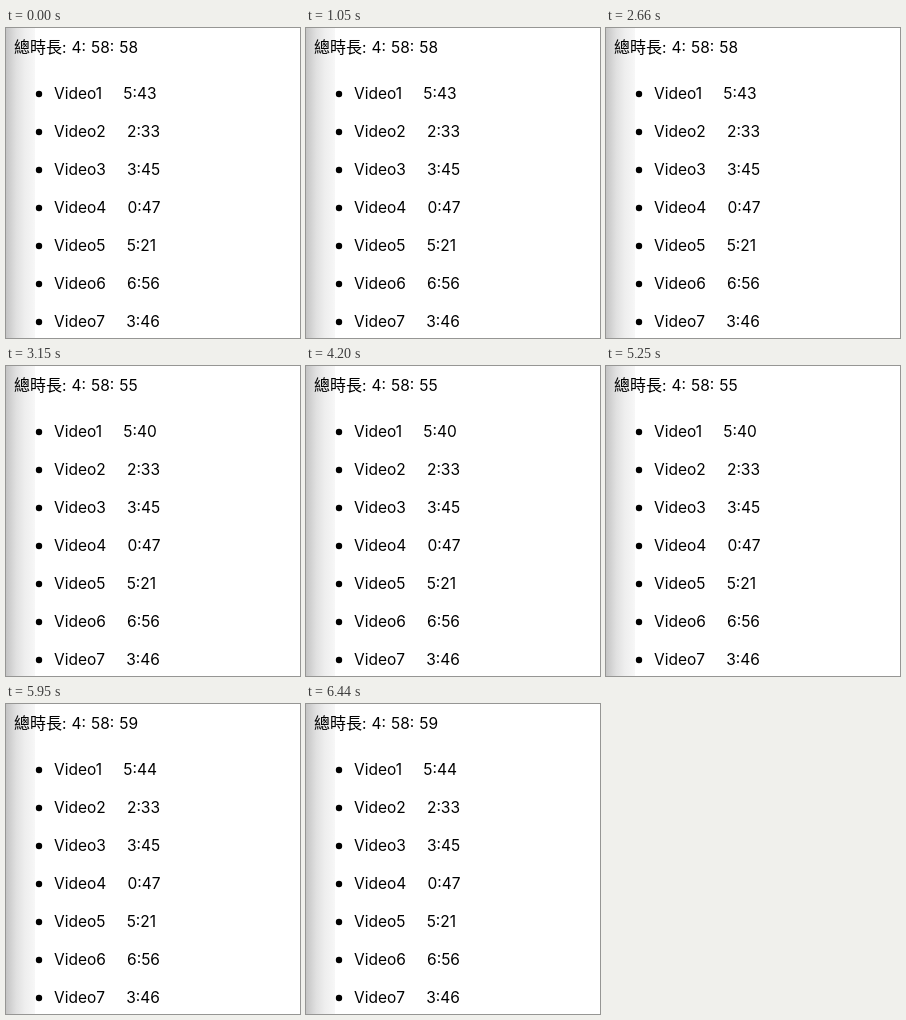
An HTML page with a canvas that plays this animation: 294x310 px, repeating every 6650 ms.

```html
<!DOCTYPE html>
<html lang="zh-Hant">
<head>
<meta charset="utf-8">
<title>Video list</title>
<style>
html, body { margin: 0; width: 100%; height: 100%; overflow: hidden; background: #fff; }
canvas { display: block; width: 294px; height: 310px; }
</style>
</head>
<body>
<canvas id="stage"></canvas>
<script>
const W = 294, H = 310, LOOP = 6650;
const ROW = 38, TEXT_X = 48, GAP = 21.2;
const LATIN = '15.5px Inter, "Open Sans", sans-serif';
const HAN = '16px "Noto Sans CJK TC", "Noto Sans CJK JP", "Noto Sans CJK", sans-serif';
const TIMES = ['2:33', '3:45', '0:47', '5:21', '6:56', '3:46'];

const canvas = document.getElementById('stage');
const ctx = canvas.getContext('2d');
const ratio = window.devicePixelRatio || 1;
canvas.width = W * ratio;
canvas.height = H * ratio;
ctx.scale(ratio, ratio);
ctx.wordSpacing = '0.7px';

const shade = ctx.createLinearGradient(0, 0, 29, 0);
[[0, 196], [0.15, 208], [0.35, 224], [0.65, 238], [1, 247]].forEach(([stop, v]) =>
  shade.addColorStop(stop, `rgb(${v},${v},${v})`));

// Draws a run of text and returns the x where it ends.
function write(text, x, y, font = LATIN) {
  ctx.font = font;
  ctx.fillText(text, x, y);
  return x + ctx.measureText(text).width;
}

function item(label, y, time) {
  ctx.beginPath();
  ctx.arc(33, y - 5, 3.2, 0, Math.PI * 2);
  ctx.fill();
  const end = write(label, TEXT_X, y);
  if (time) write(time, end + GAP, y);
}

function drawPlain() {
  for (let i = 0; i < 8; i++) item(`Video ${i + 1}`, 41 + i * ROW);
}

// Every second on the first video also counts in the total.
function drawTimed(seconds) {
  const end = write('總時長', 8, 25, HAN);
  write(`: 4: 58: ${seconds + 15}`, end, 25);
  [`5:${seconds}`, ...TIMES].forEach((time, i) => item(`Video${i + 1}`, 71 + i * ROW, time));
}

function draw(t) {
  ctx.fillStyle = '#fff';
  ctx.fillRect(0, 0, W, H);
  ctx.fillStyle = shade;
  ctx.fillRect(0, 0, 29, H);
  ctx.fillStyle = '#000';
  if (t < 2800) drawTimed(43);
  else if (t < 5600) drawTimed(40);
  else if (t < 5880) drawPlain();
  else drawTimed(44);
}

const start = performance.now();
function tick() {
  draw((performance.now() - start) % LOOP);
  requestAnimationFrame(tick);
}
tick();
</script>
</body>
</html>
```
